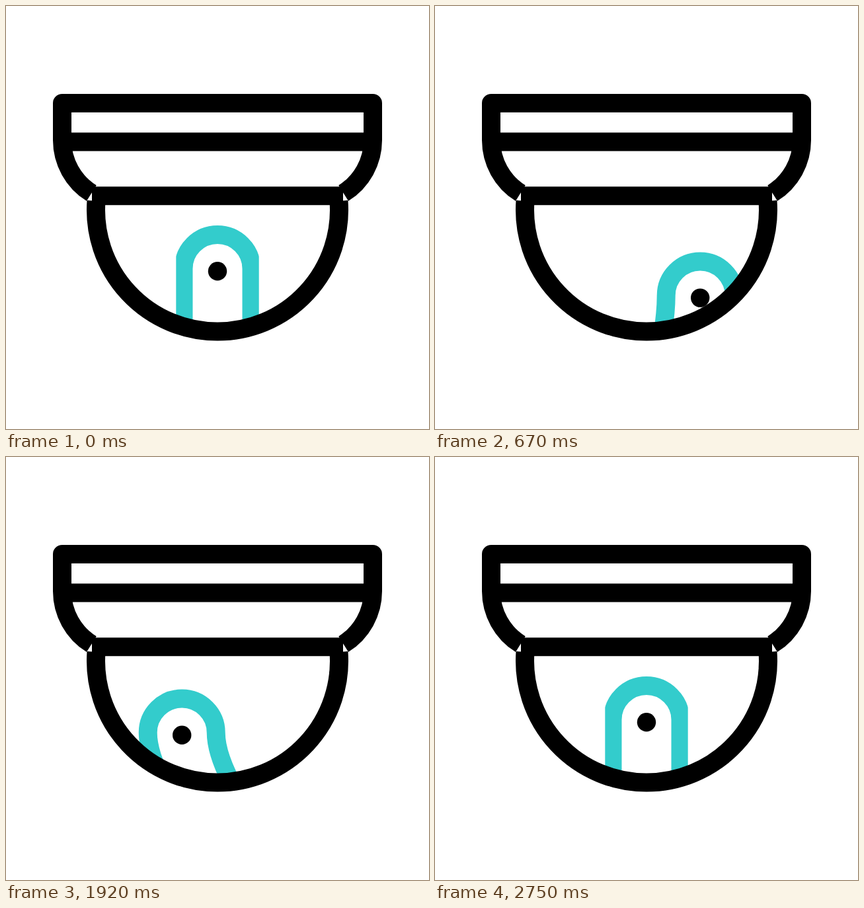
Recreate the animation shown at these times as an HTML page. Size 640 px wide and 640 px high, loop 3000 ms.

```html
<!DOCTYPE html>
<html lang="en">
<head>
<meta charset="utf-8">
<title>Dome camera</title>
<style>
  html, body { margin: 0; width: 100%; height: 100%; overflow: hidden; background: #fff; }
  svg { display: block; width: 100%; height: 100%; }
</style>
</head>
<body>
<svg viewBox="0 0 640 640" fill="none" stroke-width="28">
  <clipPath id="dome"><circle cx="320" cy="309" r="188"/></clipPath>
  <clipPath id="slot"><rect x="257.3" y="300" width="125.4" height="220"/></clipPath>
  <g clip-path="url(#dome)">
    <g id="lens"><path id="arch" stroke="#33cccc"/></g>
  </g>
  <circle id="pupil" r="14.2" fill="#000"/>
  <g stroke="#000">
    <path stroke-linejoin="round" d="M129.4 283.2 A94.5 94.5 0 0 1 85 203 V147 H555 V203 A94.5 94.5 0 0 1 510.6 283.2"/>
    <path d="M85 205.5 H555 M130 287.3 H510"/>
    <path d="M136.5 295 A184 184 0 1 0 503.5 295"/>
  </g>
</svg>
<script>
const LOOP = 3000, FPS = 24;
const HALF_WIDTH = 51.5, LEG_END = 564;

// Pose: [pupil x, pupil y, sideways bend of the legs]
const centre = [320, 401.2, 0];
const upRight = [401, 377.8, -27];
const downRight = [401.2, 441.6, -18];
const downLeft = [272.9, 432, 63];
const upLeft = [239.5, 375.5, 87];

// Moves: [first frame, last frame, from, to]
const moves = [
  [0, 5, centre, upRight],
  [12, 16, upRight, downRight],
  [26, 32, downRight, downLeft],
  [45, 50, downLeft, upLeft],
  [61, 66, upLeft, centre]
];

const arch = document.getElementById("arch");
const lens = document.getElementById("lens");
const pupil = document.getElementById("pupil");

function poseAt(frame) {
  const [start, end, from, to] = moves.filter(m => m[0] <= frame).pop();
  const k = Math.min(1, (frame - start) / (end - start));
  return from.map((v, i) => v + (to[i] - v) * k);
}

function archPath(x, y, bend) {
  const top = y - 3.6, knee = top + 0.35 * (LEG_END - top);
  const left = x - HALF_WIDTH, right = x + HALF_WIDTH;
  return `M${left + bend} ${LEG_END} Q${left} ${knee} ${left} ${top}` +
    ` A${HALF_WIDTH} ${HALF_WIDTH} 0 0 1 ${right} ${top}` +
    ` Q${right} ${knee} ${right + bend} ${LEG_END}`;
}

function draw(now) {
  // Frame changes fall on times rounded to 10 ms
  const frame = Math.floor((now % LOOP + 5) * FPS / 1000) % (LOOP * FPS / 1000);
  const [x, y, bend] = poseAt(frame);
  arch.setAttribute("d", archPath(x, y, bend));
  pupil.setAttribute("cx", x);
  pupil.setAttribute("cy", y);
  // At rest the arch is trimmed by a narrow slot
  lens.setAttribute("clip-path", frame === 0 || frame >= 66 ? "url(#slot)" : "none");
}

let begin;
function tick(now) {
  begin ??= now;
  draw(now - begin);
  requestAnimationFrame(tick);
}
draw(0);
requestAnimationFrame(tick);
</script>
</body>
</html>
```
